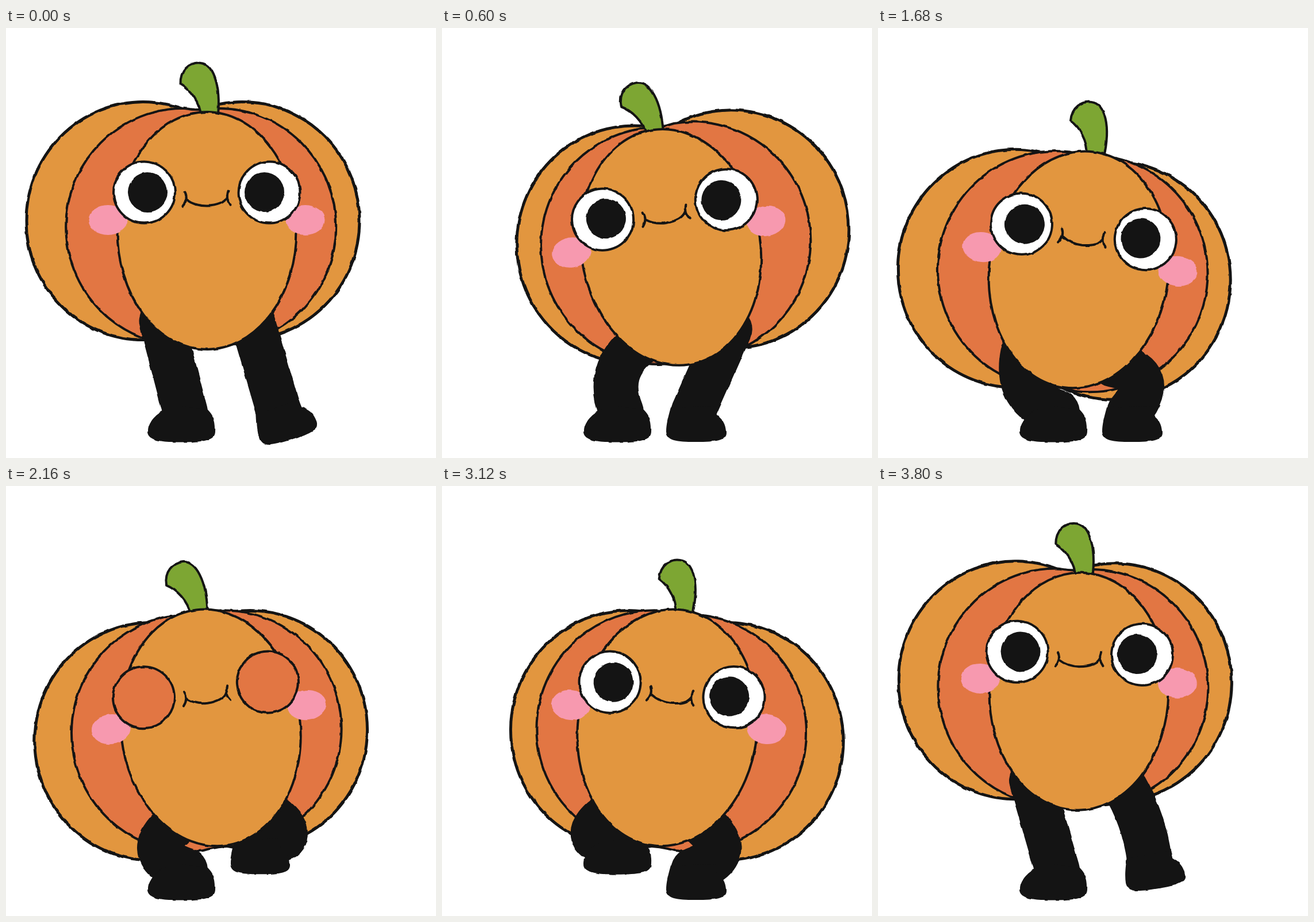
Recreate the animation shown at these times as an HTML page. Size 748 px wide and 748 px high, loop 3.84 s.

```html
<!DOCTYPE html>
<html lang="en">
<head>
<meta charset="utf-8">
<title>Dancing pumpkin</title>
<style>
  html, body { margin: 0; width: 100%; height: 100%; overflow: hidden; background: #fff; }
  svg { display: block; width: 100vw; height: 100vh; }
  .line { stroke: #141414; stroke-width: 4; stroke-linecap: round; stroke-linejoin: round; }
  .rind { fill: #e2963f; }
  .dark { fill: #e27643; }
  .ink { fill: #141414; }
  .leg { fill: none; stroke: #141414; stroke-width: 78; stroke-linecap: round; }
  #outer { stroke-width: 5; }
</style>
</head>
<body>
<svg viewBox="0 0 748 748">
  <defs>
    <filter id="rough" filterUnits="userSpaceOnUse" x="0" y="0" width="748" height="748" color-interpolation-filters="sRGB">
      <feTurbulence type="fractalNoise" baseFrequency=".07" numOctaves="1" seed="4"/>
      <feColorMatrix values="1 0 0 0 0  0 1 0 0 0  0 0 1 0 0  0 0 0 0 1" result="noise"/>
      <feDisplacementMap in="SourceGraphic" in2="noise" scale="4" xChannelSelector="R" yChannelSelector="G"/>
    </filter>
  </defs>
  <g filter="url(#rough)">
    <g class="body">
      <g id="outer" class="rind line">
        <ellipse cx="-86" rx="204" ry="207"/>
        <ellipse cx="86" rx="204" ry="207"/>
      </g>
      <path id="mid" class="dark line" d="M-30-206A205 206 0 0 0-30 206Q0 201 30 206A205 206 0 0 0 30-206Q0-201-30-206Z"/>
    </g>
    <path id="legL" class="leg"/>
    <path id="legR" class="leg"/>
    <path id="footL" class="ink" d="M-40-2C-55 6-66 20-66 34C-66 50-40 52.5-8 52.5C30 52.5 52 50 52 34C53 15 48 5 39-4L0-10Z"/>
    <path id="footR" class="ink" d="M-39-8C-44 10-47 22-47 34C-46 50-30 52 5 52C40 52 57 50 57 36C57 20 50 12 40 4L39-10Z"/>
    <g class="body">
      <path class="line" fill="#7da633" d="M-10-198C-12-225-30-246-46-255C-47-280-30-292-14-292C10-292 25-255 19-198Z"/>
      <ellipse class="rind line" rx="156" ry="206.5"/>
      <g fill="#f799af">
        <ellipse cx="-172" cy="-18.5" rx="34" ry="26"/>
        <ellipse cx="171" cy="-18.5" rx="34" ry="26"/>
      </g>
      <path class="line" fill="none" d="M-38-67Q-32-55-42-43M-35-54Q-20-43 0-43Q28-44 35-58M37-69Q32-56 41-44"/>
      <g id="eyes" class="line">
        <circle cx="-109" cy="-66.5" r="53.5"/>
        <circle cx="108.5" cy="-66.5" r="53.5"/>
      </g>
      <g id="pupils" class="ink">
        <circle cx="-103" cy="-67" r="34.5"/>
        <circle cx="100" cy="-67" r="34.5"/>
      </g>
    </g>
  </g>
</svg>
<script>
const LOOP = 3840, CYCLE = 1920, STEP = 40;
const $ = id => document.getElementById(id);
const bodies = document.querySelectorAll('.body');

const clamp = u => Math.min(1, Math.max(0, u));
const span = (t, from, to) => clamp((t - from) / (to - from));
const ramp = (t, from, to) => { const u = span(t, from, to); return u * u * (3 - 2 * u); };
const hop = (t, from, to) => Math.sin(Math.PI * span(t, from, to));

// s is the time from the moment this foot taps the floor at the side
function drawLeg(name, side, homeX, s, body) {
  const hx = 79 * side, hy = 157;
  const x0 = body.x + hx * body.cos - hy * body.sin;
  const y0 = body.y + hx * body.sin + hy * body.cos;

  const kick = 38 * (ramp(s, -240, 0) - ramp(s, 0, 240));
  const lift = 36 * hop(s, -240, 0) + 46 * hop(s, 0, 560);
  const flex = 18 * (ramp(s, -80, 0) - ramp(s, 0, 140));
  const x1 = homeX + side * kick, y1 = 668 - lift;

  // the knee bends outwards as the leg shortens
  const dx = x1 - x0, dy = y1 - y0, len = Math.hypot(dx, dy);
  const bend = side * 1.28 * Math.sqrt(Math.max(0, 72 * 72 - len * len / 4));
  const kx = (x0 + x1) / 2 + dy / len * bend;
  const ky = (y0 + y1) / 2 - dx / len * bend;
  $('leg' + name).setAttribute('d', `M${x0} ${y0}Q${kx} ${ky} ${x1} ${y1}`);
  $('foot' + name).setAttribute('transform', `translate(${x1} ${y1}) rotate(${-side * flex})`);
}

function draw(time) {
  const t = time % CYCLE, turn = 2 * Math.PI * t / CYCLE;
  const sway = 24.5 * (2 * (ramp(t, 125, 637) - ramp(t, 1085, 1597)) - 1);
  const y = 384.4 - 36 * Math.cos(4 * turn) + 4.2 * Math.cos(2 * turn);
  const rad = -0.173 * Math.sin(turn);
  const body = { x: 374 + sway, y, sin: Math.sin(rad), cos: Math.cos(rad) };
  const pose = `translate(${body.x} ${y}) rotate(${rad * 180 / Math.PI})`;
  for (const g of bodies) g.setAttribute('transform', pose);

  // back segments shift further than the front one
  const drop = -17 + 28 * ((y - 350) / 70) ** 3;
  $('outer').setAttribute('transform', `translate(${sway} ${drop})`);
  $('mid').setAttribute('transform', `translate(${sway * 0.42} ${drop * 0.4})`);

  drawLeg('L', -1, 312, t - CYCLE / 2, body);
  drawLeg('R', 1, 437, t < CYCLE / 2 ? t : t - CYCLE, body);

  const shut = time >= 2120 && time < 2240;
  $('eyes').setAttribute('fill', shut ? '#e27643' : '#fff');
  $('pupils').setAttribute('visibility', shut ? 'hidden' : 'visible');
}

const start = performance.now();
function tick() {
  const time = (performance.now() - start) % LOOP;
  draw(Math.floor(time / STEP) * STEP);
  requestAnimationFrame(tick);
}
tick();
</script>
</body>
</html>
```
